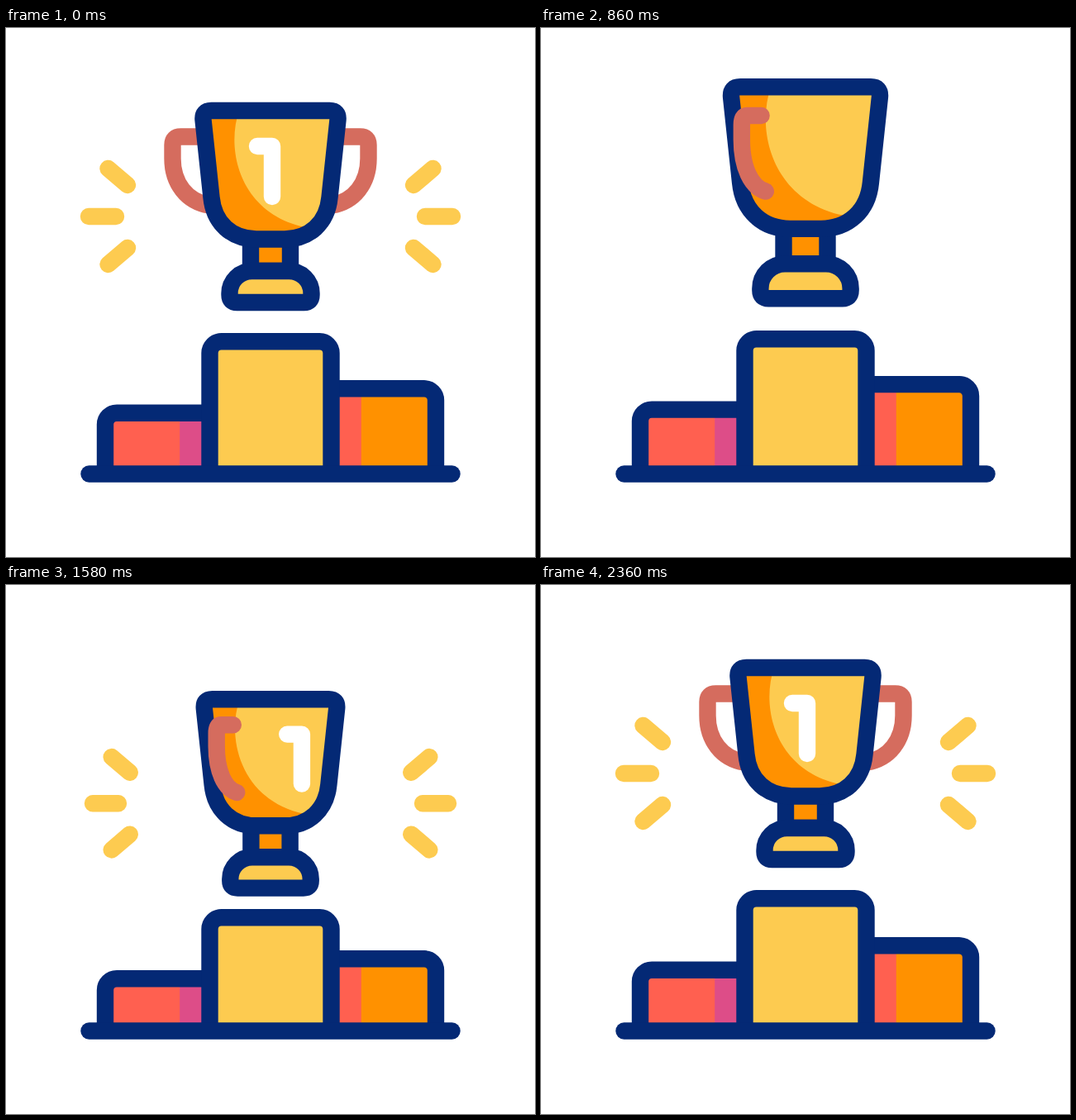
Write an HTML page that moves like this. It is 640 px wide and 640 px high and loops after 2.74 s.

```html
<!DOCTYPE html>
<html lang="en">
<head>
<meta charset="utf-8">
<title>Winner's trophy</title>
<style>
  html, body { margin: 0; width: 100%; height: 100%; overflow: hidden; background: #fff; }
  svg { display: block; width: 640px; height: 640px; }
  path { vector-effect: non-scaling-stroke; }
  .line { stroke: #042975; }
  .step { stroke-linecap: butt; }
  .handle { stroke: #d56c5e; }
</style>
</head>
<body>
<svg viewBox="0 0 640 640" fill="none" stroke-width="20.4" stroke-linecap="round" stroke-linejoin="round">
  <defs>
    <path id="cupShape" d="M-71.5-116H71.5Q82.5-116 81.5-105L71.5-11C68.5 20 47 39.5 17 39.5H-17C-47 39.5-68.5 20-71.5-11L-81.5-105Q-82.5-116-71.5-116Z"/>
    <path id="handleShape" d="M-82-84.5H-108.5Q-118.5-84.5-118.5-74.5V-58C-118.5-28-101-6-74-1.5"/>
    <clipPath id="cupClip"><use href="#cupShape"/></clipPath>
  </defs>

  <g id="trophy">
    <path id="rays" stroke="#fdcb50"/>
    <use id="leftHandle" class="handle" href="#handleShape"/>
    <use id="rightHandle" class="handle" href="#handleShape"/>
    <path class="line" fill="#ff9100" d="M-24 40V78H24V40"/>
    <path class="line" fill="#fdcb50" d="M-22.5 78H22.5A27 27 0 0 1 49.5 105V107Q49.5 116 40.5 116H-40.5Q-49.5 116-49.5 107V105A27 27 0 0 1-22.5 78Z"/>
    <g clip-path="url(#cupClip)">
      <use href="#cupShape" fill="#fdcb50"/>
      <path fill="#ff9100" d="M-38-116C-55-66-35 9 42 25L30 45H-90V-116Z"/>
      <path id="one" stroke="#fff" d="M-16-73H2V-12"/>
    </g>
    <use class="line" href="#cupShape"/>
    <use id="frontHandle" class="handle" href="#handleShape"/>
  </g>

  <path id="leftFill" fill="#ff6050"/>
  <path id="leftShade" fill="#dd4d88"/>
  <path id="leftStep" class="line step"/>
  <path id="rightFill" fill="#ff9100"/>
  <path id="rightShade" fill="#ff6050"/>
  <path id="rightStep" class="line step"/>
  <path id="middleStep" class="line step" fill="#fdcb50"/>
  <path class="line" d="M100.5 539.5H539.5"/>
</svg>
<script>
const LOOP = 2740, FLOOR = 539.5, CENTER = 320;
const el = id => document.getElementById(id);
const set = (id, name, value) => el(id).setAttribute(name, value);
const show = (id, visible) => set(id, 'display', visible ? 'inline' : 'none');

// Progress along the Bezier easing (a, 0, b, 1)
function ease(u, a, b) {
  let low = 0, high = 1, s;
  for (let i = 0; i < 24; i++) {
    s = (low + high) / 2;
    const x = 3 * a * s * (1 - s) ** 2 + 3 * b * s * s * (1 - s) + s ** 3;
    if (x < u) low = s; else high = s;
  }
  return s * s * (3 - 2 * s);
}

// Eased move between two values, held before and after
function move(t, start, end, from, to, a = .4, b = .6) {
  const u = Math.min(1, Math.max(0, (t - start) / (end - start)));
  return from + (to - from) * ease(u, a, b);
}

// Crouch, leap, land, rebound and settle, as an offset from rest
function jump(t, softness, leap, dip, rebound, crouch = .83 * dip) {
  if (t < 450) return move(t, 200, 450, 0, -crouch);
  if (t < 1290) return move(t, 450, 1290, -crouch, leap, .33, softness);
  if (t < 1570) return move(t, 1290, 1570, leap, -dip);
  if (t < 2000) return move(t, 1570, 2000, -dip, rebound, .4, .4);
  return move(t, 2000, 2340, rebound, 0);
}

function rayGrowth(t) {
  if (t < 1480) return move(t, 200, 400, 1, 0);
  if (t < 1660) return move(t, 1480, 1660, 0, 1.2, .33, .33);
  if (t < 1850) return move(t, 1660, 1850, 1.2, .81);
  return move(t, 1850, 2100, .81, 1);
}

function drawRays(growth) {
  let d = '';
  for (const side of [-1, 1])
    for (const row of [-1, 0, 1]) {
      const x = row ? 173 : 187, dx = row ? 23.5 : 33;
      d += `M${side * x} ${12 + 38 * row}L${side * (x + dx * growth)} ${12 + row * (38 + 20 * growth)}`;
    }
  set('rays', 'd', d);
  set('rays', 'stroke-width', 20.4 * Math.min(1, growth * 4));
  show('rays', growth > .01);
}

function drawTrophy(t) {
  const y = 216 - jump(t, .36, 38.5, 36.5, 14.6);
  const scale = 1 + jump(t, .4, .19, .016, .012, .062);
  set('trophy', 'transform', `translate(${CENTER} ${y}) scale(${scale})`);

  // Spin is counted in half turns; the numeral faces forward on even counts
  const spin = t < 1582 ? move(t, 426, 1582, 0, 4.22, .45, .55) : move(t, 1582, 1900, 4.22, 4, .45, .55);
  const part = spin % 1, turn = 1 - 2 * part;
  const inFront = part > .05 && part < .95;
  for (const id of ['leftHandle', 'frontHandle']) set(id, 'transform', `scale(${turn} 1)`);
  set('rightHandle', 'transform', `scale(${-turn} 1)`);
  show('leftHandle', !inFront);
  show('frontHandle', inFront);
  set('one', 'transform', `translate(${166 * ((spin + 1) % 2 - 1)} 0)`);
}

function drawSideStep(name, side, height) {
  const top = FLOOR - height, at = x => CENTER + side * x;
  const box = edge => `M${at(74)} ${FLOOR}V${top}H${at(edge)}V${FLOOR}Z`;
  set(name + 'Fill', 'd', box(195));
  set(name + 'Shade', 'd', box(109.8));
  set(name + 'Step', 'd', `M${at(200)} ${FLOOR}V${top + 14}A14 14 0 0 ${side < 0 ? 1 : 0} ${at(186)} ${top}H${at(74)}`);
}

function drawPodium(t) {
  const rise = (leap, dip) => jump(t, .5, leap, dip, .15 * dip);
  drawSideStep('left', -1, 73.8 + rise(13, 10.5));
  drawSideStep('right', 1, 103.2 + rise(18, 16));
  const top = FLOOR - 160.2 - rise(18.5, 23);
  set('middleStep', 'd', `M246.5 ${FLOOR}V${top + 14}a14 14 0 0 1 14-14H379.5a14 14 0 0 1 14 14V${FLOOR}`);
}

const start = performance.now();
function frame() {
  const t = (performance.now() - start) % LOOP;
  drawTrophy(t);
  drawRays(rayGrowth(t));
  drawPodium(t);
  requestAnimationFrame(frame);
}
frame();
</script>
</body>
</html>
```
